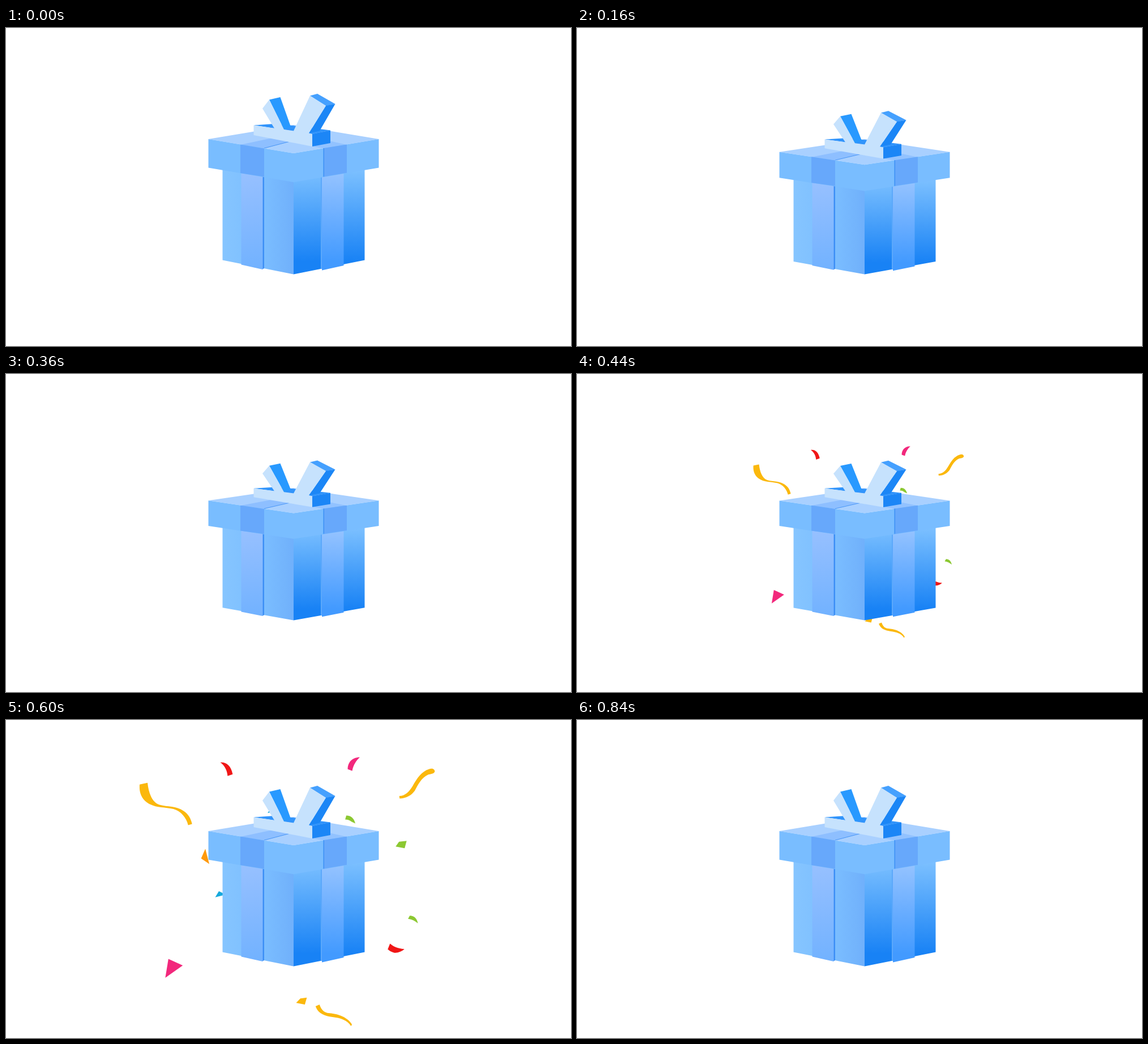
These frames come from a looping animation (998 px wide and 561 px high, 1040 ms). An HTML page:

```html
<!DOCTYPE html>
<html lang="en">
<head>
<meta charset="utf-8">
<title>Gift box</title>
<style>
html, body { margin: 0; height: 100%; overflow: hidden; background: #fff; }
svg { display: block; width: 100vw; height: 100vh; }
</style>
</head>
<body>
<svg viewBox="0 0 998 561">
  <defs>
    <linearGradient id="left" gradientUnits="userSpaceOnUse" x1="382" y1="0" x2="508" y2="0">
      <stop stop-color="#86c5ff"/><stop offset=".6" stop-color="#7abdff"/><stop offset="1" stop-color="#70b0fb"/>
    </linearGradient>
    <linearGradient id="right" gradientUnits="userSpaceOnUse" x1="0" y1="250" x2="0" y2="412">
      <stop stop-color="#7cc0ff"/><stop offset="1" stop-color="#1882f5"/>
    </linearGradient>
    <linearGradient id="bandL" gradientUnits="userSpaceOnUse" x1="0" y1="258" x2="0" y2="424">
      <stop stop-color="#96c0ff"/><stop offset="1" stop-color="#72b2ff"/>
    </linearGradient>
    <linearGradient id="bandR" gradientUnits="userSpaceOnUse" x1="0" y1="258" x2="0" y2="412">
      <stop stop-color="#93c2ff"/><stop offset="1" stop-color="#429aff"/>
    </linearGradient>
  </defs>

  <g id="confetti">
    <g fill="#fbb80d">
      <path d="M235 113L249 110C251 128 257 145 270 149C285 153 300 151 313 160C322 166 326 174 328 183L321 185C318 172 308 160 295 156.500C278 153 262 155 248 145C237 137 234 125 235 113Z"/>
      <path d="M758.500 90C758 85 753 84 748 86C735 90 727 102 719 116C713 126 706 133 695.500 133.500L696 138C709 137 717 132 723 124C729 113 735 101 746 96C751 94 757 95 758.500 90Z"/>
      <path d="M547 506L554 503C557 512 562 517 570 518C583 519 602 523 611.500 538L610 541C603 530 590 526.500 577 525C562 523 551 518 547 506Z"/>
      <path d="M512.500 500L520 492L531.500 490.500L528 503Z"/>
    </g>
    <g fill="#f01616">
      <path d="M378 74C388 73 397 79 400 95L391 98C390 88 386 80 378 74Z"/>
      <path d="M679 395C686 401 694 404 704.500 404.500C700 409 692 412 686 411Q679 409 675 405Z"/>
    </g>
    <g fill="#f2287c">
      <path d="M625.500 65C620 70 614 78 612 89L604 86C604 75 611 65 625.500 65Z"/>
      <path d="M286 422L311.500 433.500L280.500 455.500Z"/>
    </g>
    <g fill="#8cc832">
      <path d="M601.500 168C609 168 615 172 617.500 182L611 179C607 176 603 175 599.500 175Z"/>
      <path d="M689 223L695 214.500L708.500 213L705 226Z"/>
      <path d="M714 345.500C721 345 727 350 728.500 359C724 355 718 352 711 351Z"/>
    </g>
    <path fill="#ff9a0d" d="M351.500 227L344 244L358.500 254Z"/>
    <path fill="#16a9dc" d="M369 313L375.500 302L388 308ZM462 163.500L465 159L470 162Z"/>
  </g>

  <g id="gift">
    <!-- box -->
    <path fill="url(#left)" d="M382.500 240H508V434.500L382.500 409.500Z"/>
    <path fill="url(#right)" d="M508 240H633.500V409.500L508 434.500Z"/>
    <path fill="#3c8ff5" d="M453 250H456V424L453 425.500Z"/>
    <path fill="url(#bandL)" d="M415.500 250H453.500V426L415.500 417.500Z"/>
    <path fill="#5ba8fb" d="M556 250H559V424L556 425Z"/>
    <path fill="url(#bandR)" d="M558 250H596.500V419L558 427.500Z"/>
    <!-- lid -->
    <path fill="#a9d0ff" d="M357.500 196L508 171L658.500 196L508 221Z"/>
    <path fill="#8ebfff" d="M414 206L468 194.500L500 200.500L456 212.500Z"/>
    <path fill="#92c2ff" d="M541 208.500L573 199.500L602 206L561 212.500Z"/>
    <path fill="none" stroke="#4896f6" d="M456 212L500 200.500"/>
    <path fill="#79bdff" d="M357.500 196L508 221L658.500 196V246.500L508 272L357.500 246.500Z"/>
    <path fill="#67a8fb" d="M414 205.500L456 212.500V262.500L414 256ZM561 212L602 205.500V255.500L561 262.500Z"/>
    <path fill="#3c8ff5" d="M560.500 212H562V262L560.500 262.500Z"/>
    <!-- bow -->
    <path fill="#3194fb" d="M437.500 171.500L475 169L514 173L573 180.500L541 187Z"/>
    <path fill="#1c86f6" d="M541 187L573 180.500V203L541 209Z"/>
    <path fill="#2899ff" d="M465 126.500L484.500 122L503 174L491 179Z"/>
    <path fill="#45a0fe" d="M537 119.500L550 116L581.500 134L565 137.500Z"/>
    <path fill="#1b86f6" d="M565 137L581.500 134L554 181.500L535 185.500Z"/>
    <path fill="#c6e2fd" d="M437.500 171.500L474 177L453 142L465 126.500L491 179L508 181.500L537 119.500L565 137L535 185.500L541 187V209L437.500 189Z"/>
  </g>
</svg>
<script>
const LOOP = 1040, STEP = 40;
const gift = document.getElementById('gift');
const confetti = document.getElementById('confetti');

// [time, height] of the squashing box
const squash = [[40, 1], [160, .905], [280, .936], [400, .86], [440, .885], [600, 1], [LOOP, 1]];

const clamp = x => Math.min(1, Math.max(0, x));

function heightAt(t) {
  if (t <= squash[0][0]) return 1;
  const i = squash.findIndex(k => t <= k[0]);
  const [t0, a] = squash[i - 1], [t1, b] = squash[i];
  return a + (b - a) * (t - t0) / (t1 - t0);
}

function burstAt(t) {
  const u = clamp((t - 360) / 160);
  return .996 * (1 - (1 - u) ** 1.8) + .004 * clamp((t - 600) / 80);
}

function scaleAbout(el, x, y, sx, sy) {
  el.setAttribute('transform', `translate(${x} ${y}) scale(${sx} ${sy}) translate(${-x} ${-y})`);
}

function draw(now) {
  const t = Math.floor(now % LOOP / STEP) * STEP;
  const burst = burstAt(t);
  scaleAbout(gift, 508, 434.5, 1, heightAt(t));
  scaleAbout(confetti, 499, 280.5, burst, burst);
  confetti.style.display = t > 360 && t < 840 ? '' : 'none';
}

const start = performance.now();
function tick() {
  draw(performance.now() - start);
  requestAnimationFrame(tick);
}
tick();
</script>
</body>
</html>
```
